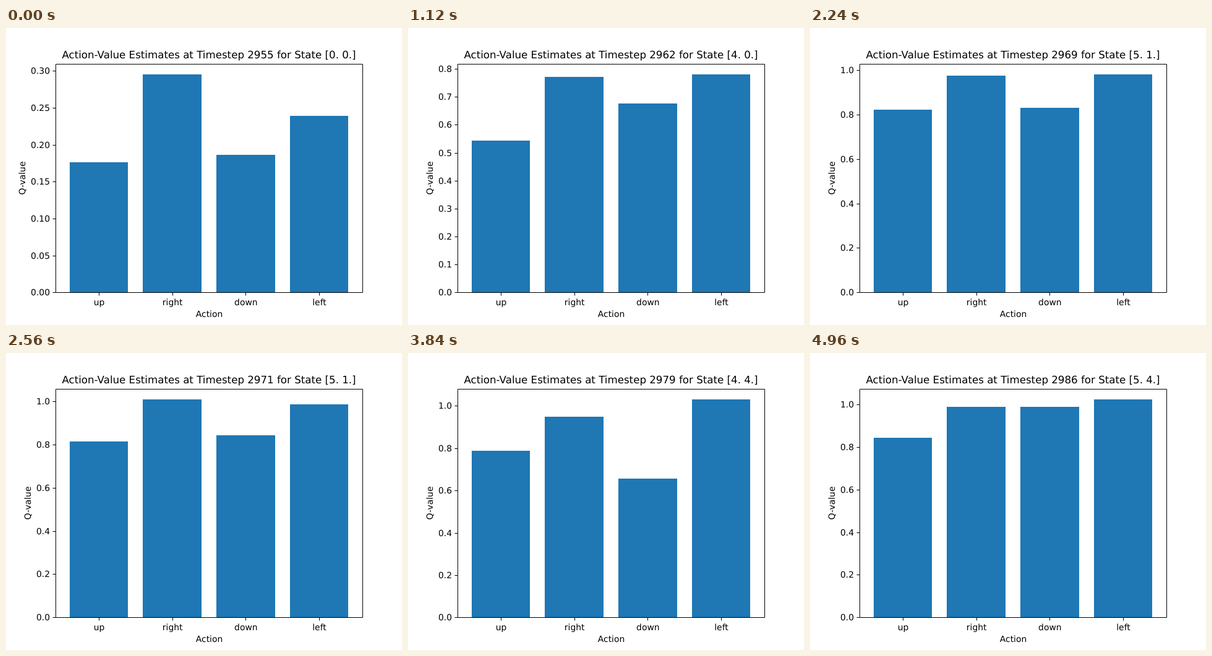
Animation, 640 px wide and 480 px high, one loop 5120 ms. Source, as an HTML page:

```html
<!DOCTYPE html>
<html lang="en">
<head>
<meta charset="utf-8">
<title>Action values</title>
<style>
  html, body { margin: 0; width: 100%; height: 100%; overflow: hidden; background: #fff; }
  svg { display: block; }
  text { font: 13.889px "DejaVu Sans", sans-serif; text-rendering: geometricPrecision; text-anchor: middle; }
  #title { font-size: 16.667px; }
  #ticks text { text-anchor: end; }
  path { fill: none; stroke: #000; }
  rect { fill: #1f77b4; }
</style>
</head>
<body>
<svg width="640" height="480" viewBox="0 0 640 480">
  <g id="bars"></g>
  <path d="M80.5 58.5H576.5V427.5H80.5Z"/>
  <g id="ticks"></g>
  <g id="actions"></g>
  <text x="328.5" y="467">Action</text>
  <text id="ylabel">Q-value</text>
  <text id="title" x="328" y="49"></text>
</svg>
<script>
const STEP_MS = 160, STEPS = 32, FIRST_TIMESTEP = 2955;
const AXIS = { left: 80, width: 496, bottom: 427.2, height: 369.6 };
const UNIT = AXIS.width / 4.18;

// Key poses: grid cell and the value of each action; steps between are interpolated.
const POSES = [
  { step: 0, cell: [0, 0], q: [0.176, 0.295, 0.186, 0.239] },
  { step: 7, cell: [4, 0], q: [0.544, 0.772, 0.677, 0.78] },
  { step: 11, cell: [5, 1], q: [0.834, 0.923, 0.815, 0.972] },
  { step: 16, cell: [5, 1], q: [0.815, 1.009, 0.844, 0.987] },
  { step: 20, cell: [5, 3], q: [0.773, 0.905, 0.972, 1.033] },
  { step: 24, cell: [4, 4], q: [0.787, 0.948, 0.656, 1.03] },
  { step: 31, cell: [5, 4], q: [0.843, 0.988, 0.988, 1.023] }
];

const byId = id => document.getElementById(id);

function add(parent, tag, attrs, content = "") {
  const node = document.createElementNS("http://www.w3.org/2000/svg", tag);
  for (const name in attrs) node.setAttribute(name, attrs[name]);
  node.textContent = content;
  return parent.appendChild(node);
}

const bars = ["up", "right", "down", "left"].map((name, i) => {
  const toX = offset => AXIS.left + (i + offset) * UNIT;
  const x = Math.round(toX(0.19));
  const middle = toX(0.59);
  add(byId("actions"), "path", { d: `M${Math.round(middle) + 0.5} 427.5v5` });
  add(byId("actions"), "text", { x: middle + 0.5, y: 448 }, name);
  return add(byId("bars"), "rect", { x, width: Math.round(toX(0.99)) - x });
});

function poseAt(step) {
  const next = Math.max(1, POSES.findIndex(pose => pose.step >= step));
  const from = POSES[next - 1], to = POSES[next];
  const mix = (step - from.step) / (to.step - from.step);
  const blend = key => from[key].map((value, i) => value + (to[key][i] - value) * mix);
  return { cell: blend("cell").map(Math.round), q: blend("q") };
}

function drawTicks(top, toY) {
  const spacing = [0.05, 0.1, 0.2].find(size => top / size <= 9);
  const digits = spacing < 0.1 ? 2 : 1;
  const ticks = byId("ticks");
  ticks.replaceChildren();
  for (let value = 0; value <= top; value += spacing) {
    const y = Math.round(toY(value));
    add(ticks, "path", { d: `M75.5 ${y + 0.5}h5` });
    add(ticks, "text", { x: 71, y: y + 5 }, value.toFixed(digits));
  }
  byId("ylabel").setAttribute("transform", `translate(${49 - 9 * (digits)} 242.5) rotate(-90)`);
}

function draw(step) {
  const { cell: [x, y], q } = poseAt(step);
  const top = Math.max(...q) * 1.05;
  const toY = value => AXIS.bottom - value / top * AXIS.height;

  bars.forEach((bar, i) => {
    const barTop = Math.round(toY(q[i]));
    bar.setAttribute("y", barTop);
    bar.setAttribute("height", 427 - barTop);
  });
  drawTicks(top, toY);
  byId("title").textContent =
    `Action-Value Estimates at Timestep ${FIRST_TIMESTEP + step} for State [${x}. ${y}.]`;
}

const start = performance.now();
let shown = -1;
function tick() {
  const step = Math.floor((performance.now() - start) / STEP_MS) % STEPS;
  if (step !== shown) draw(shown = step);
  requestAnimationFrame(tick);
}
tick();
</script>
</body>
</html>
```
